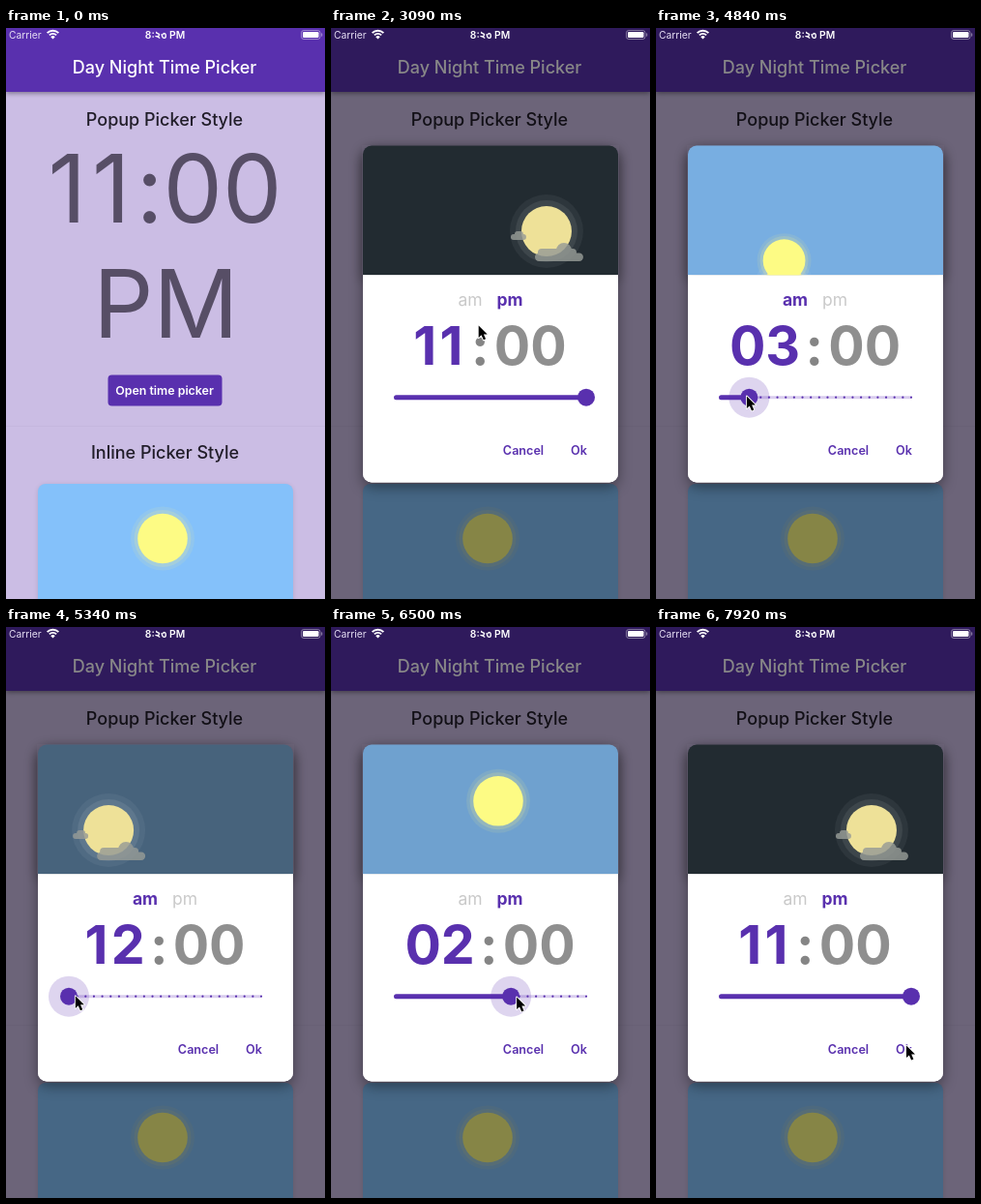
Animation, 330 px wide and 590 px high, one loop 8 s. Source, as an HTML page with a canvas:

```html
<!DOCTYPE html>
<html lang="en">
<head>
<meta charset="utf-8">
<title>Day Night Time Picker</title>
<style>
  html, body { margin: 0; width: 100%; height: 100%; overflow: hidden; background: #cbbde4; }
  canvas { display: block; width: 330px; height: 590px; }
</style>
</head>
<body>
<canvas id="stage"></canvas>
<script>
const W = 330, H = 590, LOOP = 8000;
const PURPLE = '#5930ae', DAY = [132, 193, 250], NIGHT = [34, 43, 49];
const FONT = 'Inter, "Noto Sans", "Noto Sans Bengali", sans-serif';
const OPEN = 1120, TAP_AM = 3670, GRAB = 4330, DROP = 7250;
const FLIPS = [TAP_AM, 4715, 5715, 6830]; // day and night alternate here
const SLIDER = { x: 65, y: 381.7, step: 199 / 23 };
const CARD = { x: 33, y: 121.5, w: 264, h: 348, split: 255.3 };

const stage = document.getElementById('stage');
const layer = document.createElement('canvas');
const scale = Math.max(1, window.devicePixelRatio || 1);
const [page, sheet] = [stage, layer].map(c => {
  c.width = W * scale;
  c.height = H * scale;
  const ctx = c.getContext('2d');
  ctx.scale(scale, scale);
  return ctx;
});
let g = page;

const clamp = (v, a = 0, b = 1) => Math.min(b, Math.max(a, v));
const ease = p => p * p * (3 - 2 * p);
const mix = (a, b, p) => a + (b - a) * p;

// time, x, y, eased arrival
const PATH = [
  [150, 342, 474, 0], [880, 168, 367, 1], [1150, 168, 366, 1], [2500, 168, 366, 1],
  [3450, 144, 279, 1], [3730, 144, 279, 1], [4080, 188, 366, 1],
  [4260, 162, 380, 1], [GRAB, 162, 380, 1], [4715, 114.4, 380, 0], [4840, 93, 380, 0],
  [5050, 70, 380, 0], [5450, 71, 381, 1], [5715, 114.8, 381, 0], [5840, 137, 381, 0],
  [6500, 191, 382, 0], [6830, 227, 382, 0], [7120, 267, 381, 0],
  [DROP, 267, 381, 1], [7680, 258, 432, 1]
];

function cursorAt(t) {
  const i = PATH.findIndex(k => k[0] > t);
  if (i === 0) return PATH[0].slice(1, 3);
  if (i < 0) return PATH[PATH.length - 1].slice(1, 3);
  const a = PATH[i - 1], b = PATH[i];
  let p = (t - a[0]) / (b[0] - a[0]);
  if (b[3]) p = ease(p);
  return [mix(a[1], b[1], p), mix(a[2], b[2], p)];
}

function hourAt(t) {
  if (t < TAP_AM || t >= DROP) return 23;
  if (t < GRAB) return 11;
  return clamp(Math.round((cursorAt(t)[0] - 2 - SLIDER.x) / SLIDER.step), 0, 23);
}

// Hour averaged over the last few milliseconds, so parts glide between steps
function glideHour(t, span) {
  const n = 24;
  let sum = 0;
  for (let i = 0; i < n; i++) sum += hourAt(t - span * i / n);
  return sum / n;
}

function skyAt(t) {
  let k = 0;
  FLIPS.forEach((start, i) => {
    const run = Math.min(t, FLIPS[i + 1] || LOOP) - start;
    if (run > 0) k = clamp(k + (i % 2 ? -run : run) / 1000);
  });
  return `rgb(${NIGHT.map((v, i) => Math.round(mix(v, DAY[i], k)))})`;
}

function text(s, x, y, size, weight, color, align = 'center') {
  g.font = `${weight} ${size}px ${FONT}`;
  g.textAlign = align;
  g.fillStyle = color;
  g.fillText(s, x, y);
}

// Digits with a roomier "1"; returns the total width
function figures(s, x, y, size, weight, color) {
  let w = 0;
  g.font = `${weight} ${size}px ${FONT}`;
  for (const c of s) {
    if (color) text(c, x + w, y, size, weight, color, 'left');
    w += g.measureText(c).width + (c === '1' ? .06 * size : 0);
  }
  return w;
}

function box(x, y, w, h, r, color) {
  g.fillStyle = color;
  g.beginPath();
  g.roundRect(x, y, w, h, r);
  g.fill();
}

function disc(x, y, r, color) {
  g.fillStyle = color;
  g.beginPath();
  g.arc(x, y, r, 0, 7);
  g.fill();
}

function shadow(blur, dy, alpha, draw) {
  g.save();
  g.shadowColor = `rgba(0,0,0,${alpha})`;
  g.shadowBlur = blur * scale;
  g.shadowOffsetY = dy * scale;
  draw();
  g.restore();
}

function sun() {
  disc(0, 0, 33, 'rgba(255,240,130,.1)');
  disc(0, 0, 29.5, 'rgba(255,240,130,.17)');
  disc(0, 0, 25.8, '#fdfb84');
}

function moon() {
  disc(0, 0, 38, 'rgba(255,255,255,.05)');
  disc(0, 0, 32, 'rgba(255,255,255,.08)');
  disc(0, 0, 26, '#eee198');
  g.fillStyle = 'rgba(150,155,150,.82)';
  g.beginPath();
  g.roundRect(-37, 3, 16, 6, 3);
  g.roundRect(-33, 0, 9, 6, 3);
  g.fill();
  g.beginPath();
  g.roundRect(-12, 22.5, 50, 8.5, 4.2);
  g.roundRect(-9, 18, 40, 8, 4);
  g.arc(18, 20, 8, 0, 7);
  g.fill();
}

function body(draw, x, y, size) {
  g.save();
  g.translate(x, y);
  g.scale(size, size);
  draw();
  g.restore();
}

function bodies(t) {
  const h = glideHour(t, 250);
  const x = 162 + (h - 11) * 5.08;
  const y = 210 - 31 * Math.sin(Math.PI * h / 23);
  const passed = FLIPS.filter(f => f <= t);
  const isDay = passed.length % 2 === 1;
  const p = passed.length ? clamp((t - passed[passed.length - 1]) / 250) : 1;
  g.save();
  g.beginPath();
  g.rect(CARD.x, CARD.y, CARD.w, CARD.split - CARD.y);
  g.clip();
  for (const [draw, current] of [[moon, !isDay], [sun, isDay]]) {
    if (!current && p === 1) continue;
    const away = current ? 1 - p * p : p;
    body(draw, x, y + 100 * away, 1 - .3 * away);
  }
  g.restore();
}

function slider(t) {
  const { x, y, step } = SLIDER;
  const knob = x + glideHour(t, 70) * step;
  box(x, y - 1.5, 199, 3, 1.5, '#d9cdee');
  for (let i = 0; i < 24; i++) {
    if (x + i * step > knob) disc(x + i * step, y, 1.1, PURPLE);
  }
  box(x, y - 2.5, knob - x, 5, 2.5, PURPLE);
  const glow = clamp((t - GRAB) / 100) * clamp((DROP + 100 - t) / 100);
  if (glow > 0) disc(knob, y, 21 * glow, 'rgba(89,48,174,.2)');
  disc(knob, y, 9, PURPLE);
}

function clock(h) {
  const hour = String(h % 12 || 12).padStart(2, '0');
  const size = 55.5, gap = 29, base = 347.5;
  const hw = figures(hour, 0, 0, size, 700), mw = figures('00', 0, 0, size, 700);
  const left = 164.5 - (hw + gap + mw) / 2;
  figures(hour, left, base, size, 700, PURPLE);
  text(':', left + hw + gap / 2, base, size, 700, '#858585');
  figures('00', left + hw + gap, base, size, 700, '#8f8f8f');
}

function popup(t) {
  const { x, y, w, h, split } = CARD;
  const hour = hourAt(t), am = hour < 12;
  shadow(14, 5, .4, () => box(x, y, w, h, 9, '#fff'));
  g.clearRect(x - 1, y - 1, w + 2, split - y + 1);
  shadow(14, 5, .4, () => box(x, y, w, split - y, [9, 9, 0, 0], skyAt(t)));
  box(x, split, w, y + h - split, [0, 0, 9, 9], '#fff');
  bodies(t);
  [['am', 144, am], ['pm', 185, !am]].forEach(([s, cx, on]) =>
    text(s, cx, 287, 17.5, on ? 700 : 400, on ? PURPLE : '#c9c9c9'));
  clock(hour);
  slider(t);
  text('Cancel', 199, 440.5, 12.6, 600, PURPLE);
  text('Ok', 256.5, 440.5, 12.6, 600, PURPLE);
}

function home(t) {
  g.fillStyle = '#cbbde4';
  g.fillRect(0, 0, W, H);
  text('Popup Picker Style', 164, 100.5, 18, 500, '#211d29');
  const big = 97.5, ink = '#574e66';
  figures('11:00', 164.5 - figures('11:00', 0, 0, big, 400) / 2, 201, big, 400, ink);
  text('PM', 165.5, 320, big, 400, ink);
  box(105.5, 358.5, 118, 32, 4, PURPLE);
  const press = (t - OPEN + 120) / 300;
  if (press > 0 && press < 1) box(105.5, 358.5, 118, 32, 4, `rgba(255,255,255,${.2 * (1 - press)})`);
  text('Open time picker', 164, 379, 12.4, 600, '#fff');
  g.fillStyle = '#c5b7de';
  g.fillRect(0, 411, W, 1);
  text('Inline Picker Style', 164.5, 444.5, 18, 500, '#211d29');
  shadow(5, 1, .12, () => box(33, 471, 264, 140, 8, `rgb(${DAY})`));
  body(sun, 162, 527.5, 1);
  shadow(5, 1.5, .4, () => {
    g.fillStyle = PURPLE;
    g.fillRect(0, 0, W, 66);
  });
  text('Day Night Time Picker', 164, 47, 18, 500, '#fff');
}

function statusBar() {
  text('Carrier', 3, 11, 10.3, 400, '#e4dcf2', 'left');
  text('8:২৩ PM', 164.5, 11, 10.3, 600, '#fff');
  g.strokeStyle = '#fff';
  g.lineWidth = 1.9;
  for (const r of [8.3, 5.1]) {
    g.beginPath();
    g.arc(48.5, 11, r, -Math.PI * .75, -Math.PI * .25);
    g.stroke();
  }
  g.fillStyle = '#fff';
  g.beginPath();
  g.moveTo(48.5, 11.5);
  g.arc(48.5, 11.5, 3.2, -Math.PI * .75, -Math.PI * .25);
  g.fill();
  g.strokeStyle = 'rgba(255,255,255,.4)';
  g.lineWidth = 1;
  g.beginPath();
  g.roundRect(305.5, 2.5, 19.5, 9, 2.5);
  g.stroke();
  box(307, 4, 16.5, 6, 1.3, '#fff');
  box(326, 5.3, 1.3, 3.4, .6, 'rgba(255,255,255,.4)');
}

function pointer(t) {
  const [x, y] = cursorAt(t);
  g.save();
  g.translate(x + 1, y + .5);
  g.scale(.9, .9);
  g.beginPath();
  [[0, 0], [0, 14], [3.2, 11], [5.7, 16.6], [8.2, 15.5], [5.8, 10], [10, 10]]
    .forEach(([px, py]) => g.lineTo(px, py));
  g.closePath();
  g.lineJoin = 'round';
  g.lineWidth = 2;
  g.strokeStyle = '#fff';
  g.stroke();
  g.fillStyle = '#000';
  g.fill();
  g.restore();
}

function draw(t) {
  g = page;
  home(t);
  const shown = ease(clamp((t - OPEN) / 280));
  if (shown > 0) {
    g.fillStyle = `rgba(0,0,0,${.47 * shown})`;
    g.fillRect(0, 0, W, H);
    g = sheet;
    g.clearRect(0, 0, W, H);
    popup(t);
    g = page;
    g.globalAlpha = shown;
    g.drawImage(layer, 0, 0, W, H);
    g.globalAlpha = 1;
  }
  statusBar();
  pointer(t);
}

const begin = performance.now();
function tick() {
  draw((performance.now() - begin) % LOOP);
  requestAnimationFrame(tick);
}
tick();
</script>
</body>
</html>
```
